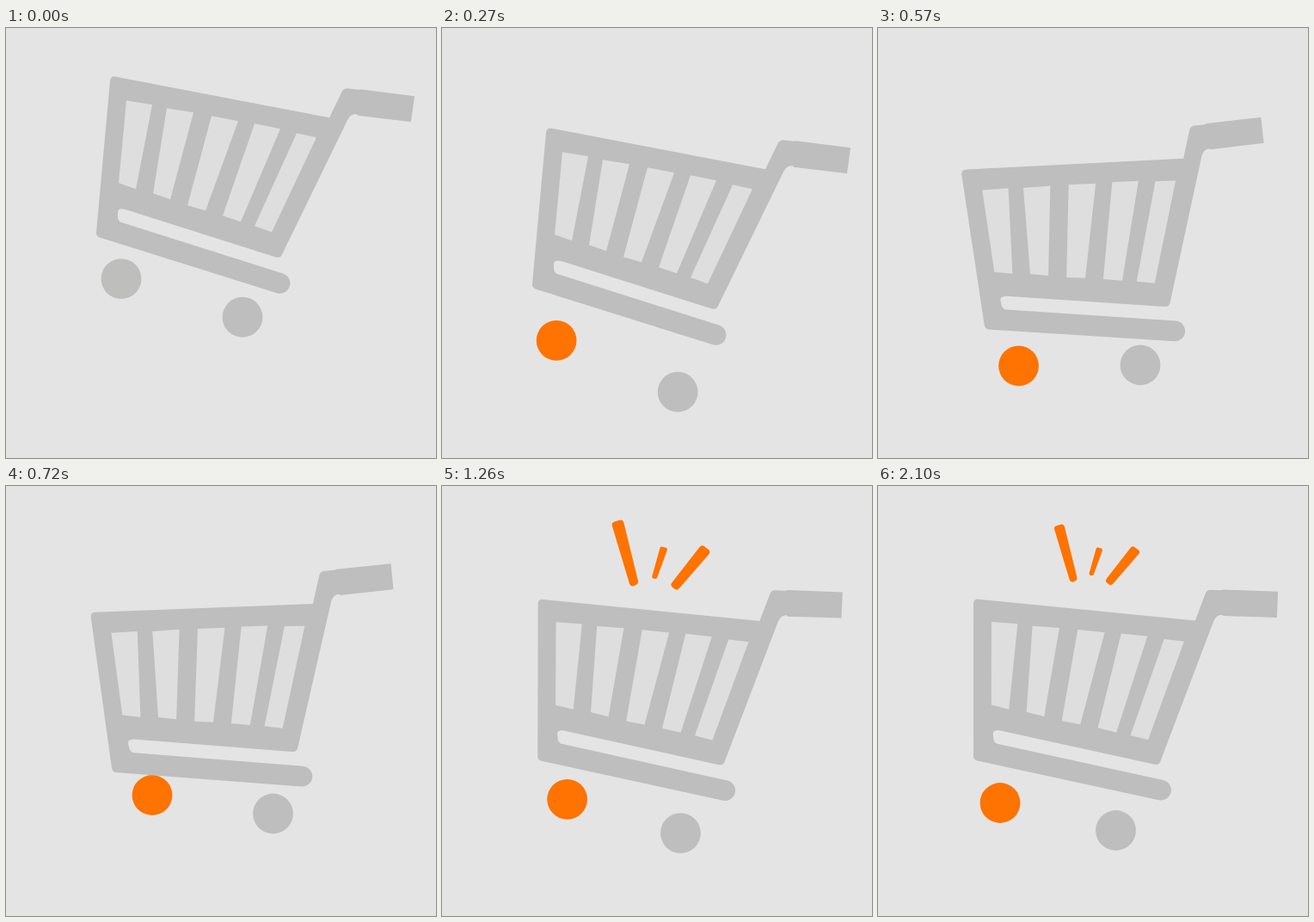
An HTML page that plays this animation: 500x500 px, repeating every 2.13 s.

```html
<!DOCTYPE html>
<html lang="en">
<head>
<meta charset="utf-8">
<title>Bouncing cart</title>
<style>
html, body {
  margin: 0;
  width: 100%;
  height: 100%;
  overflow: hidden;
  background: #e4e4e4;
}
svg {
  display: block;
  width: 100%;
  height: 100%;
}
svg * {
  animation-duration: 2130ms;
  animation-iteration-count: infinite;
  animation-timing-function: linear;
}
.cart, .wheel { fill: #bebebe; }
.gap { fill: #dedede; }
.cart {
  transform-origin: 230px 180px;
  animation-name: drop, tilt;
}
.left { animation-name: left, tint; }
.right { animation-name: right; }
.rays {
  fill: #ff7300;
  stroke: #ff7300;
  stroke-width: 7;
  stroke-linejoin: round;
  transform-origin: 254.5px 78px;
  animation-name: pop;
}
.thin { stroke-width: 4; }

@keyframes drop {
  0% { translate: 0 0; animation-timing-function: cubic-bezier(.35, .25, .7, .68); }
  12.68% { translate: 0 60px; }
  21.13% { translate: .6px 106.7px; animation-timing-function: ease-out; }
  22.5% { translate: .8px 108px; animation-timing-function: cubic-bezier(.4, 0, .7, .6); }
  25.35% { translate: 1.2px 96px; animation-timing-function: cubic-bezier(.3, .4, .6, 1); }
  30% { translate: 1.8px 61px; animation-timing-function: ease-in-out; }
  33.8% { translate: 1.8px 64px; }
  49.3% { translate: 1px 67px; animation-timing-function: ease-in-out; }
  71.83% { translate: .3px 64px; animation-timing-function: ease-in-out; }
  98.59%, 100% { translate: .3px 65.5px; }
}
@keyframes tilt {
  0%, 13.5% { rotate: 0deg; animation-timing-function: cubic-bezier(.4, 0, .75, .6); }
  21.13% { rotate: -7deg; }
  25.35% { rotate: -12.5deg; animation-timing-function: cubic-bezier(.3, .6, .6, 1); }
  29.1% { rotate: -14.5deg; animation-timing-function: cubic-bezier(.4, 0, .7, .6); }
  33.8% { rotate: -13.1deg; }
  49.3% { rotate: -6.2deg; animation-timing-function: ease-out; }
  60%, 71.83% { rotate: -5.1deg; }
  98.59%, 100% { rotate: -5.2deg; }
}
@keyframes left {
  0% { translate: 134px 291.5px; animation-timing-function: cubic-bezier(.35, .2, .7, .65); }
  12.68% { translate: 133px 363px; }
  18.78% { translate: 146px 417px; animation-timing-function: ease-out; }
  21.13% { translate: 152px 429.5px; animation-timing-function: ease-out; }
  22.3% { translate: 154.5px 431.5px; animation-timing-function: ease-in; }
  25.35% { translate: 161px 406px; animation-timing-function: cubic-bezier(.3, .5, .6, 1); }
  33.8% { translate: 170px 359.5px; animation-timing-function: ease-in-out; }
  49.3% { translate: 151.5px 361.5px; animation-timing-function: ease-out; }
  71.83% { translate: 142px 366px; }
  98.59%, 100% { translate: 142px 368.5px; }
}
@keyframes right {
  0% { translate: 275px 336px; animation-timing-function: cubic-bezier(.35, .25, .7, .75); }
  12.68% { translate: 274px 423px; animation-timing-function: ease-out; }
  16% { translate: 280px 431.5px; animation-timing-function: ease-in; }
  21.13% { translate: 295.5px 415px; }
  25.35% { translate: 303px 396px; animation-timing-function: ease-out; }
  33.8% { translate: 310.5px 381px; animation-timing-function: ease-in-out; }
  49.3% { translate: 281px 401px; animation-timing-function: ease-out; }
  56% { translate: 277.5px 404px; animation-timing-function: ease-in-out; }
  71.83% { translate: 276.5px 399px; }
  98.59%, 100% { translate: 276.5px 400.5px; }
}
@keyframes tint {
  0% { fill: #bebebe; }
  11%, 100% { fill: #ff7300; }
}
@keyframes pop {
  0%, 49% { scale: 0; animation-timing-function: cubic-bezier(.3, .5, .5, 1); }
  56.3% { scale: 1.24; animation-timing-function: ease-in-out; }
  63%, 100% { scale: 1; }
}
</style>
</head>
<body>
<svg viewBox="0 0 500 500">
  <circle class="wheel left" r="23.4"/>
  <circle class="wheel right" r="23.4"/>
  <g class="cart">
    <!-- basket, handle and lower bar -->
    <path d="M121 61Q122 55 128 56.5L376 104 391 73Q393 70 397 70L409 71.5 412 71 475 79 471 109 409 101.5 408 100Q401 99 397 107L321 263Q319 268 313 266L138 210.5Q130 209 130 214V220Q130.500 225 135 226L322 285.300A11.800 11.800 0 0 1 315 308L108 243Q104.500 241 105 237Z"/>
    <path class="gap" d="M140 84L170 89 151 187 131 180ZM187 93L218 98 191 199 171 192ZM239 102L270 108 232 212 211 206ZM289 111L319 117 273 225 252 218ZM338 122L361 127 309 237 289 230Z"/>
  </g>
  <g class="rays">
    <path d="M208.500 49.500L213.500 48 228 107 226 108Z"/>
    <path class="thin" d="M255.500 73.500L259 74.500 249 102 247.500 102Z"/>
    <path d="M296.500 74L300.500 77 270.500 111.500 268.500 110Z"/>
  </g>
</svg>
</body>
</html>
```
